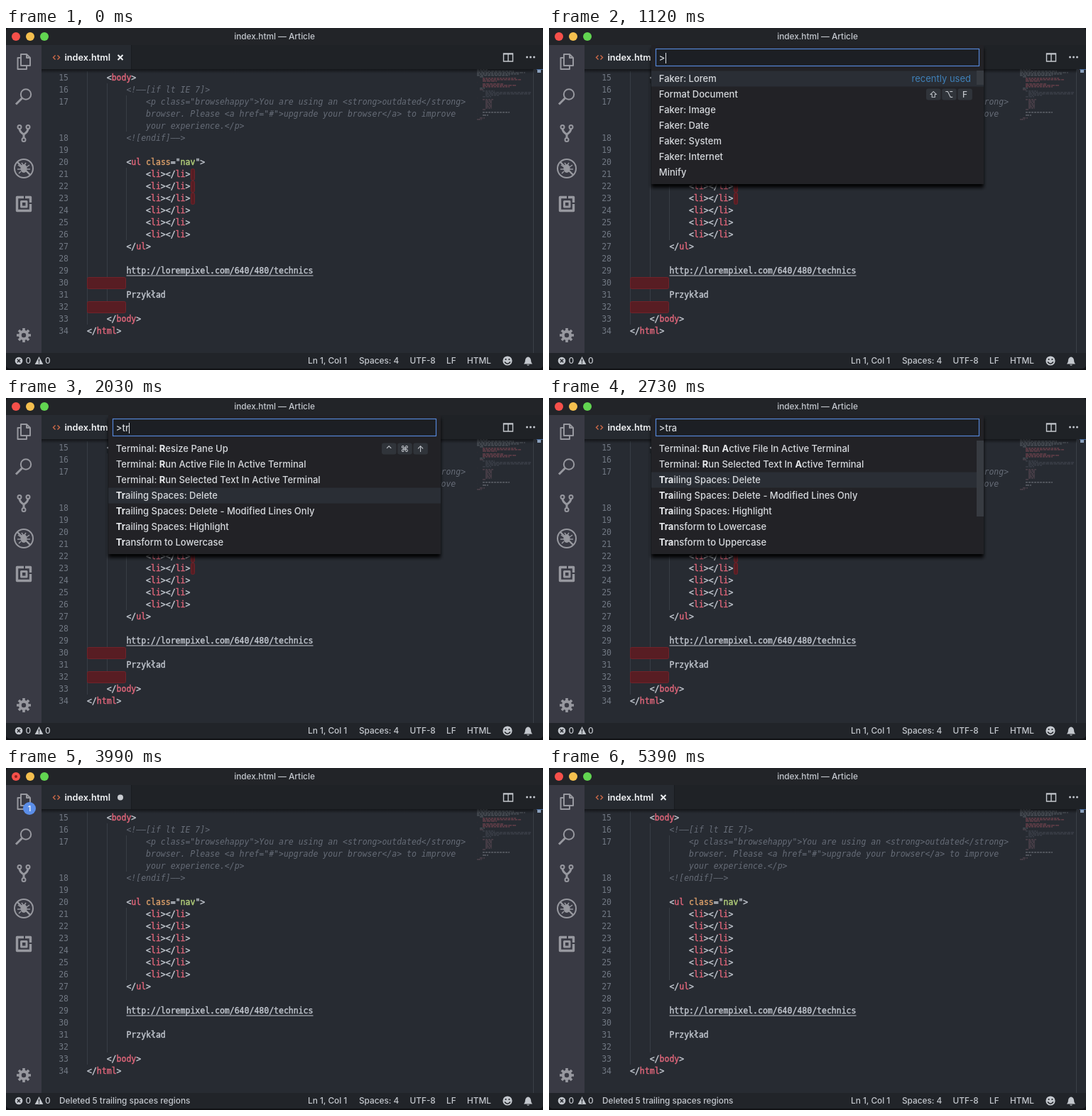
Animation of 756x482 px, one loop 5460 ms. Source, as an HTML page:

```html
<!DOCTYPE html>
<html lang="en">
<head>
<meta charset="utf-8">
<title>Trailing spaces</title>
<style>
html, body { margin: 0; width: 100%; height: 100%; overflow: hidden; background: #101114; }
svg { display: block; width: 756px; height: 482px; }
text { white-space: pre; }
.ui { font: 500 11.8px Inter, sans-serif; fill: #c4c8ce; }
.big { font-size: 13px; fill: #d6d9dd; }
.tab { font-size: 12.7px; font-weight: 600; fill: #f0f2f4; }
.mono { font: 11.5px "DejaVu Sans Mono", monospace; fill: #c3c8d0; stroke: #c3c8d0; stroke-width: .4px; }
.num { fill: #717883; stroke: none; text-anchor: end; }
.note { fill: #666c77; stroke: none; font-style: italic; }
.tag { fill: #e0667a; stroke: #e0667a; }
.attr { fill: #d79c68; stroke: #d79c68; }
.str { fill: #b3d07a; stroke: #b3d07a; }
.icon { fill: none; stroke: #97989f; stroke-width: 2; stroke-linejoin: round; }
.solid { fill: #97989f; stroke: none; }
.hit { font-weight: 700; fill: #e9ebee; }
</style>
</head>
<body>
<svg id="stage" viewBox="0 0 756 482"></svg>
<script>
const LOOP = 5460;
const TIMES = { open: 840, firstKey: 1540, secondKey: 1680, thirdKey: 2170, close: 2940, clean: 3360, save: 4690 };
const CHAR = 6.923, LEFT = 114, ROW = 17, TOP = 70;

const rect = (x, y, w, h, fill, extra = '') =>
  `<rect x="${x}" y="${y}" width="${w}" height="${h}" fill="${fill}" ${extra}/>`;
const circle = (x, y, r, fill, extra = '') => `<circle cx="${x}" cy="${y}" r="${r}" fill="${fill}" ${extra}/>`;
const path = (d, extra = '') => `<path d="${d}" ${extra}/>`;
const text = (x, y, cls, body, extra = '') => `<text x="${x}" y="${y}" class="${cls}" ${extra}>${body}</text>`;
const group = (id, body) => `<g id="${id}">${body}</g>`;
const escape = s => s.replace(/&/g, '&amp;').replace(/</g, '&lt;').replace(/>/g, '&gt;');

// Each entry: line number (0 for a wrapped row), indent, content, comment flag
const code = [
  [15, 4, '<body>'],
  [16, 8, '<!––[if lt IE 7]>', 1],
  [17, 12, '<p class="browsehappy">You are using an <strong>outdated</strong>', 1],
  [0, 12, 'browser. Please <a href="#">upgrade your browser</a> to improve', 1],
  [0, 12, 'your experience.</p>', 1],
  [18, 8, '<![endif]––>', 1],
  [19, 0, ''],
  [20, 8, '<ul class="nav">'],
  ...[21, 22, 23, 24, 25, 26].map(n => [n, 12, '<li></li>']),
  [27, 8, '</ul>'],
  [28, 0, ''],
  [29, 8, 'http://lorempixel.com/640/480/technics'],
  [30, 0, ''],
  [31, 8, 'Przykład'],
  [32, 0, ''],
  [33, 4, '</body>'],
  [34, 0, '</html>']
];

const tokenClass = t => t === 'class' ? 'attr' : t === 'nav' ? 'str' : 'tag';
const highlight = s => s.split(/\b(ul|li|body|html|class|nav)\b/)
  .map((t, i) => i % 2 ? `<tspan class="${tokenClass(t)}">${t}</tspan>` : escape(t)).join('');

function guides() {
  const guide = (x, y, h) => rect(x, y, 1, h, '#383d45');
  return guide(114, 61, 357) + guide(142, 78, 323) + guide(169, 95, 51) + guide(169, 197, 102);
}

function editor() {
  const rows = code.map(([n, indent, s, note], i) => {
    const y = TOP + ROW * i + 4;
    return (n ? text(88, y, 'mono num', n) : '') +
      text(LEFT + indent * CHAR, y, note ? 'mono note' : 'mono', note ? escape(s) : highlight(s));
  });
  return rows.join('') + rect(169.5, 348.5, 263, 1, '#c3c8d0');
}

function trailing() {
  const mark = (x, y, w) => rect(x + .5, y + .5, w - 1, 16, '#581d23', 'stroke="#6f232a" rx="2"');
  return [198, 215, 232].map(y => mark(260, y, 6)).join('') + mark(114, 351, 55) + mark(114, 385, 55);
}

function minimap() {
  const head = [[0, 15], [0, 52], [0, 68], [0, 60], [0, 46], [4, 6], [8, 47], [8, 54], [8, 20],
    [0, 0], [8, 30], [8, 48], [8, 38], [4, 7]];
  const rows = [
    ...head.map(([indent, len], i) => [indent, len, i > 5 && i < 13 ? '#98505c' : '#666b73']),
    ...code.map(([, indent, s, note]) => [indent, s.length,
      note ? '#4b5059' : s.startsWith('http') || s === 'Przykład' ? '#8b9098' : '#6f5660'])
  ];
  return rows.map(([indent, len, color], i) =>
    path(`M${663 + indent} ${58.9 + 2 * i}h${len}`, `stroke="${color}" stroke-dasharray="${3 + i % 3} 1" opacity=".8"`)).join('') +
    rect(742, 58, 1, 400, '#3b4047') + rect(747, 58, 9, 1, '#456a9d') + rect(748, 59, 5, 4, '#8ba0bb');
}

function activity() {
  const spokes = (n, r1, r2) => Array.from({ length: n }, (_, i) => {
    const a = i * 2 * Math.PI / n, c = Math.cos(a), s = Math.sin(a);
    return `M${c * r1} ${s * r1}L${c * r2} ${s * r2}`;
  }).join('');
  const at = (y, body) => `<g class="icon" transform="translate(25 ${y})">${body}</g>`;
  return at(47, path('M-4 -10H4L9 -5V6H-4ZM4 -10V-5H9M-4 -5H-8.500V11H4V6')) +
    at(97, circle(3, -3.5, 7.2, 'none') + path('M-2.500 2L-11 10.500', 'stroke-width="3"')) +
    at(148, circle(-6, -8.5, 2.5, 'none') + circle(6, -8.5, 2.5, 'none') + circle(0, 9.5, 2.5, 'none') +
      path('M-6 -6Q-6 -2 0 2V7M6 -6Q6 -2 0 2', 'stroke-width="3"')) +
    at(198, circle(0, 0, 13, 'none') + `<ellipse class="solid" rx="4.6" ry="6"/>` +
      path('M-8 -5L-4 -2M8 -5L4 -2M-9 1H9M-7 7L-4 4M7 7L4 4M-3 -8L-1 -5M3 -8L1 -5', 'stroke-width="1.5"') +
      path('M-9 -9L9 9', 'stroke-width="2.4"')) +
    at(248, path('M-9.500 -9.500H9.500V9.500H-9.500Z', 'stroke-width="3.4"') +
      path('M-3.500 -3.500H4V4H-3.500Z', 'stroke-width="3"') +
      path('M1 -12V-6M6 -1H12', 'stroke="#393a44"')) +
    at(433, circle(0, 0, 5.2, 'none', 'stroke-width="4"') + path(spokes(8, 6, 10), 'stroke-width="3.6"'));
}

function statusBar() {
  const items = [[425, 'Ln 1, Col 1'], [497, 'Spaces: 4'], [568.5, 'UTF-8'], [620, 'LF'], [649, 'HTML']];
  const ink = '#c3c7cd', cut = 'fill="none" stroke="#212429" stroke-width="1.4"';
  return rect(0, 458, 756, 22, '#212429') +
    circle(18, 469, 5.3, ink) + path('M15.800 466.800L20.200 471.200M20.200 466.800L15.800 471.200', cut) +
    text(27.5, 473, 'ui', '0') +
    path('M46.500 463L52.300 474H40.700Z', `fill="${ink}"`) + path('M46.500 466.500V470.500M46.500 471.500V473', cut) +
    text(55, 473, 'ui', '0') +
    items.map(([x, s]) => text(x, 473, 'ui', s)).join('') +
    circle(706, 469, 6.6, ink) + circle(703.6, 467, 1.1, '#212429') + circle(708.4, 467, 1.1, '#212429') +
    path('M702 470.500Q706 476 710 470.500', cut) +
    path('M729 473.500Q731 472 731 468Q731.500 464 735 463.500Q738.500 464 739 468Q739 472 741 473.500ZM733 474.500H737Q735 477 733 474.500Z', `fill="${ink}"`);
}

function frame() {
  const chrome = rect(0, 0, 756, 24, '#222428') + rect(50, 24, 706, 34, '#1f2226') +
    rect(50, 24, 126, 34, '#262a30') + rect(176, 24, 1, 34, '#191b1f') +
    rect(50, 58, 706, 400, '#272b32') + rect(0, 24, 50, 434, '#393a44');
  const lights = ['#f5504a', '#f5c04e', '#62d551'].map((c, i) => circle(14 + 20 * i, 12, 6, c)).join('');
  return chrome + lights + text(378, 16, 'ui', 'index.html — Article', 'text-anchor="middle"') +
    path('M69.500 38.500L66.500 41.500L69.500 44.500M72.500 38.500L75.500 41.500L72.500 44.500', 'fill="none" stroke="#d06a48" stroke-width="1.4"') +
    text(82.5, 46, 'ui tab', 'index.html') +
    path('M700.500 36H713.500V47H700.500ZM707 36V47M700 36.700H714', 'fill="none" stroke="#c3c7cd" stroke-width="1.4"') +
    [733.5, 738.5, 743.5].map(x => circle(x, 41, 1.5, '#c3c7cd')).join('');
}

function keys(y, x, labels) {
  return [...labels].map((k, i) => rect(x + 22.2 * i, y - 8, 20.5, 16, '#30343a', 'rx="3"') +
    text(x + 10.2 + 22.2 * i, y + 4, 'ui', k, 'text-anchor="middle"')).join('');
}

function list(id, rows, selected, extra) {
  const items = rows.map((s, i) => text(154.8, 76 + 22 * i, 'ui big',
    s.split('*').map((t, j) => j % 2 ? `<tspan class="hit">${t}</tspan>` : t).join('')));
  return group(id, rect(144, 60.5 + 22 * selected, 468, 22, '#2a2e35') + items.join('') + extra);
}

function palette() {
  const scrollbar = h => rect(602, 60, 10, h, '#373b41');
  const tail = ['*Tra*iling Spaces: Delete', '*Tra*iling Spaces: Delete - Modified Lines Only',
    '*Tra*iling Spaces: Highlight', '*Tra*nsform to Lowercase', '*Tra*nsform to Uppercase'];
  const recent = ['Faker: Lorem', 'Format Document', 'Faker: Image', 'Faker: Date', 'Faker: System', 'Faker: Internet', 'Minify'];
  const two = ['Terminal: *R*esize Pane Up', 'Terminal: *R*un Active File In Active Terminal',
    'Terminal: *R*un Selected Text In Active Terminal', ...tail.slice(0, 4).map(s => s.replace('*Tra*', '*Tr*a'))];
  const three = ['Terminal: *R*un *A*ctive File In Active Terminal',
    'Terminal: *R*un Selected Text In *A*ctive Terminal', ...tail];
  return rect(144, 24, 468, 196, '#202328', 'filter="url(#shadow)"') +
    rect(150.5, 29.5, 455, 24, '#1c1f24', 'stroke="#5585d6" stroke-width="1.2"') +
    list('recent', recent, 0, text(594, 76, 'ui big', 'recently used', 'text-anchor="end" style="fill:#3f80b8;font-weight:400"') +
      keys(93.5, 531, '⇧⌥F') + scrollbar(20)) +
    list('two', two, 3, keys(71.5, 529, '⌃⌘↑')) +
    list('three', three, 2, scrollbar(107)) +
    text(154.8, 47, 'ui big', '', 'id="query"') + rect(163, 35, 1, 15, '#dfe2e6', 'id="caret"');
}

const stage = document.getElementById('stage');
stage.innerHTML = `<defs>
  <filter id="shadow" x="-10%" y="-10%" width="120%" height="130%"><feDropShadow dx="0" dy="5" stdDeviation="2.5" flood-color="#000" flood-opacity=".95"/></filter>
  <linearGradient id="fade" x2="0" y2="1"><stop stop-color="#000" stop-opacity=".5"/><stop offset="1" stop-color="#000" stop-opacity="0"/></linearGradient>
  <clipPath id="window"><rect width="756" height="480" rx="5"/></clipPath></defs>
  <g clip-path="url(#window)">` +
  frame() + guides() + group('spaces', trailing()) + editor() + minimap() +
  rect(50, 58, 693, 6, 'url(#fade)') + activity() + statusBar() +
  group('cross', path('M157.500 38L164.500 45M164.500 38L157.500 45', 'stroke="#eef0f3" stroke-width="2"')) +
  group('dirty', circle(161, 41.5, 4, '#c9ccd1') + circle(14, 12, 2, '#8f201d') + circle(33, 57, 9, '#5b8ee8') +
    text(33, 61, 'ui', '1', 'text-anchor="middle" style="fill:#fff;font-size:11px"')) +
  group('message', text(75, 473, 'ui', 'Deleted 5 trailing spaces regions')) +
  group('palette', palette()) + '</g>';

const el = id => document.getElementById(id);
const show = (id, on) => el(id).setAttribute('display', on ? 'inline' : 'none');
const queryNode = el('query');

function draw(t) {
  const within = (a, b) => t >= a && t < b;
  const strokes = [TIMES.open, TIMES.firstKey, TIMES.secondKey, TIMES.thirdKey];
  const typed = Math.max(0, strokes.filter(s => t >= s).length - 1);
  const opened = within(TIMES.open, TIMES.close);
  const unsaved = within(TIMES.clean, TIMES.save);
  show('palette', opened);
  show('recent', typed === 0);
  show('two', typed === 1 || typed === 2);
  show('three', typed === 3);
  show('spaces', t < TIMES.clean);
  show('message', t >= TIMES.clean);
  show('dirty', unsaved);
  show('cross', !unsaved && !opened);
  if (!opened) return;
  queryNode.textContent = '>' + 'tra'.slice(0, typed);
  el('caret').setAttribute('x', Math.round(155 + queryNode.getComputedTextLength()));
  show('caret', (t - strokes[typed]) % 1000 < 500);
}

const start = performance.now();
function tick() {
  draw((performance.now() - start) % LOOP);
  requestAnimationFrame(tick);
}
tick();
</script>
</body>
</html>
```
